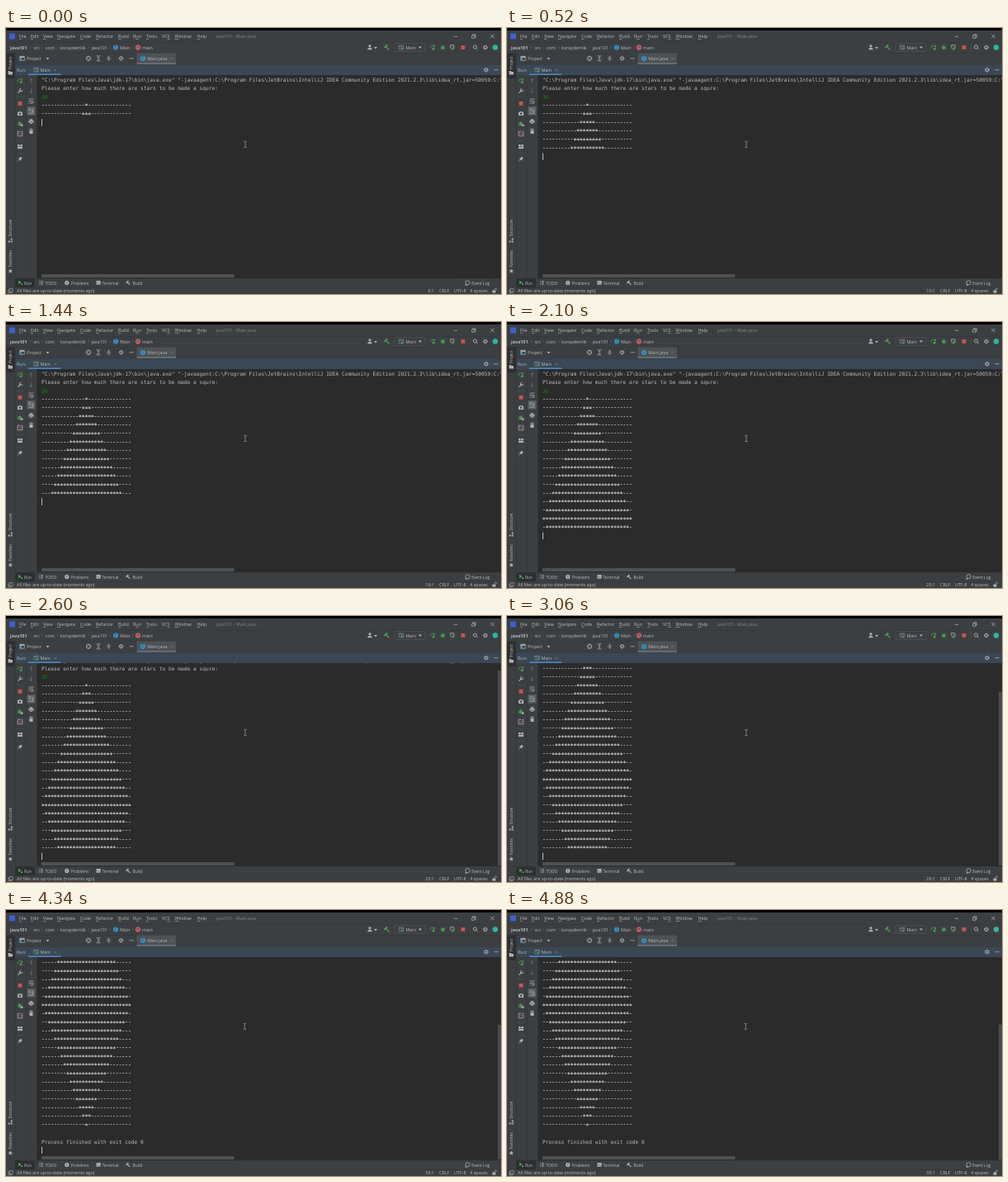
Write an HTML page that moves like this. It is 600 by 322 pixels and loops after 4920 ms.

```html
<!DOCTYPE html>
<html lang="en">
<head>
<meta charset="utf-8">
<title>Star diamond in the console</title>
<style>
html, body { margin: 0; width: 100%; height: 100%; overflow: hidden; background: #3c3f41; }
svg { display: block; width: 100vw; height: 100vh; }
text { font-family: "Open Sans", "Noto Sans", sans-serif; fill: #bbbbbb; white-space: pre; }
#console text { font-family: "DejaVu Sans Mono", monospace; font-size: 6.24px; }
#console .stars { stroke: #bbbbbb; stroke-width: .28px; }
.u { text-decoration: underline; text-decoration-thickness: .4px; }
</style>
</head>
<body>
<svg viewBox="0 0 600 322" preserveAspectRatio="none">
  <defs><clipPath id="view"><rect x="38" y="57" width="562" height="245"/></clipPath></defs>
  <g id="chrome"></g>
  <g clip-path="url(#view)"><g id="console"></g></g>
  <g id="over"></g>
</svg>
<script>
const NS = "http://www.w3.org/2000/svg";
const $ = id => document.getElementById(id);
const chrome = $("chrome"), con = $("console"), over = $("over");

function add(parent, tag, attrs, str) {
  const el = document.createElementNS(NS, tag);
  for (const k in attrs) el.setAttribute(k, attrs[k]);
  if (str !== undefined) el.textContent = str;
  return parent.appendChild(el);
}
const box = (x, y, width, height, fill, g = chrome) => add(g, "rect", { x, y, width, height, fill });
const label = (x, y, str, opt = {}) => add(chrome, "text", { x, y, "font-size": 5.4, ...opt }, str);
const GREY = "#afb1b3", GREEN = "#499c54", RED = "#c75450", BLUE = "#3592c4", DIM = "#6b6e70";

// line icon centred on x, y
const icon = (x, y, d, stroke = GREY, fill = "none", w = .8) =>
  add(chrome, "path", { d, stroke, fill, "stroke-width": w, transform: `translate(${x} ${y})` });
const solid = (x, y, d, fill = GREY) => icon(x, y, d, "none", fill);
const dot = (x, y, r, fill) => add(chrome, "circle", { cx: x, cy: y, r, fill });

const cross = (x, y, s = 1.3, c = "#7d8082") => icon(x, y, `M${-s} ${-s}L${s} ${s}M${s} ${-s}L${-s} ${s}`, c, "none", .6);
const drop = (x, y) => solid(x, y, "M-2 -1H2L0 1.4Z");
const minus = (x, y) => icon(x, y, "M-2.6 0H2.6");
const stop = (x, y) => box(x - 2.4, y - 2.4, 4.8, 4.8, RED);
const play = (x, y, s = 1) => solid(x, y, `M${-2 * s} ${-2.6 * s}L${2.4 * s} 0L${-2 * s} ${2.6 * s}Z`, GREEN);
const rule = (x, y, w = 9) => box(x, y, w, .5, "#515151");
function gear(x, y) {
  add(chrome, "circle", { cx: x, cy: y, r: 2.4, fill: "none", stroke: GREY, "stroke-width": 1, "stroke-dasharray": "1.1 .78" });
  add(chrome, "circle", { cx: x, cy: y, r: 1.6, fill: "none", stroke: GREY, "stroke-width": 1 });
}
function rerun(x, y) {
  icon(x, y, "M-2.6 .8A2.6 2.6 0 0 1 1.6 -1.8", GREEN, "none", .9);
  solid(x, y, "M.4 -.6H3V-3.2Z", GREEN);
  box(x - .2, y + .4, 2.8, 2.6, GREEN);
}
function bug(x, y) {
  add(chrome, "ellipse", { cx: x, cy: y + .3, rx: 1.7, ry: 2.4, fill: GREEN });
  icon(x, y, "M-2.8 -1.6L2.8 2M2.8 -1.6L-2.8 2M-2.9 .3H2.9M-1 -3L0 -2L1 -3", GREEN, "none", .6);
}
function classIcon(x, y, c = BLUE, ch = "C") {
  dot(x, y, 3.1, c);
  label(x, y + 1.6, ch, { "font-size": 4.4, "text-anchor": "middle", style: "fill:#2f3437" });
}
function runConfig(x, y) {
  icon(x, y, "M-2.8 -2.4H2.8V2.4H-2.8ZM-2.8 -1.2H2.8", "#87929a", "none", .6);
  solid(x + 1.2, y + 1.2, "M-1.4 -1.7L1.6 0L-1.4 1.7Z", GREEN);
}
const folder = (x, y) => solid(x, y, "M-2.7 -2.2H-.5L.3 -1.3H2.7V2.2H-2.7Z");

function drawTop() {
  box(0, 0, 600, 322, "#3c3f41");
  box(0, 0, 600, 3, "#000");
  box(4, 6.5, 7, 7, "#3b5fd0");

  const menu = [["File", 16], ["Edit", 30], ["View", 45], ["Navigate", 62], ["Code", 90], ["Refactor", 109],
    ["Build", 136], ["Run", 154, 1], ["Tools", 170], ["VCS", 189, 2], ["Window", 204.5], ["Help", 231.5]];
  for (const [name, x, k = 0] of menu) {
    const t = label(x, 12, name.slice(0, k));
    add(t, "tspan", { class: "u" }, name[k]);
    add(t, "tspan", {}, name.slice(k + 1));
  }
  label(255, 12, "java101 - Main.java", { style: "fill:#85888a" });
  icon(545, 10, "M-2.2 .3H2.2", "#ccc", "none", .6);
  icon(567, 10, "M-2.3 -1H1V2.3H-2.3ZM-1.2 -1V-2.2H2.2V1.2H1", "#ccc", "none", .6);
  cross(589.5, 10, 2.2, "#ccc");

  const y = 25.6;
  label(5, y, "java101", { "font-weight": 700 });
  label(33.5, y, "src");
  label(48, y, "com");
  label(66, y, "koraydemlik");
  label(103.5, y, "java101");
  label(138, y, "Main");
  label(165, y, "main");
  for (const x of [30, 44, 63, 100, 126, 154]) icon(x, 23.6, "M-.6 -1.4L.6 0L-.6 1.4", DIM, "none", .5);
  classIcon(133, 23.5);
  classIcon(160, 23.5, "#d3616b", "m");

  dot(441, 21.8, 1.6, GREY);
  solid(441, 23.5, "M-3 2.8Q-2.6 .3 0 .3Q2.6 .3 3 2.8Z");
  drop(448, 24);
  icon(461.5, 23.5, "M-1.2 -1.2L3 3", GREEN, "none", 1.3);
  icon(461.5, 23.5, "M-3 .4L.6 -3", GREEN, "none", 1.9);
  add(chrome, "rect", { x: 471, y: 18.5, width: 37, height: 10, rx: 1, fill: "none", stroke: "#595c5e", "stroke-width": .5 });
  runConfig(479, 23.5);
  label(484.5, y, "Main");
  drop(502, 23.5);
  rerun(517, 23.5);
  bug(529.5, 23.5);
  icon(541, 23.2, "M-2.4 -2.4H2V.6Q1.4 2.4 -.2 3Q-2.4 1.8 -2.4 -2.4Z");
  play(542.6, 24.6, .7);
  stop(554, 23.5);
  box(562, 19, .5, 9, "#515151");
  icon(568.5, 23, "M1.5 1.5L3.2 3.2M2 0A2 2 0 1 1 -2 0A2 2 0 1 1 2 0", GREY, "none", .9);
  gear(581, 23.5);
  dot(593, 23.5, 3.2, "#2fb5a0");

  for (const v of [17, 30, 44]) box(0, v, 600, .5, "#323435");
  icon(19.5, 36.8, "M-2.8 -2.5H2.8V2.5H-2.8Z", GREY, "none", .7);
  box(16.8, 34.3, 5.4, 1.6, GREY);
  box(16.8, 36, 2.2, 3.2, BLUE);
  label(25.2, 38.7, "Project");
  drop(50.5, 37);
  icon(100, 36.8, "M2.7 0A2.7 2.7 0 1 1 -2.7 0A2.7 2.7 0 1 1 2.7 0M0 -2.7V-.9M0 2.7V.9M-2.7 0H-.9M2.7 0H.9");
  icon(112, 36.8, "M-2.6 -3H2.6M-2.6 3H2.6M0 -2V2M-1.2 -.8L0 -2L1.2 -.8M-1.2 .8L0 2L1.2 .8", GREY, "none", .7);
  icon(124.5, 36.8, "M-2.6 0H2.6M0 -3V-1M0 3V1M-1.2 -2.2L0 -1L1.2 -2.2M-1.2 2.2L0 1L1.2 2.2", GREY, "none", .7);
  gear(139.5, 36.8);
  minus(152, 36.8);
  box(158.5, 30.5, 47.5, 13, "#4e5254");
  box(158.5, 42.3, 47.5, 1.4, "#747a80");
  classIcon(166, 36.8);
  label(171.2, 38.7, "Main.java");
  cross(200.5, 37);
}

function drawPanels() {
  box(11, 44.5, 589, 12.5, "#3b4754");
  label(13, 52.7, "Run:");
  runConfig(36.5, 50.7);
  label(41.5, 52.7, "Main");
  cross(60, 51);
  box(27, 55.4, 39.5, 1.6, "#4a88c7");
  gear(582, 50.7);
  minus(594, 50.7);

  // console and its two toolbars
  box(37.5, 57, 562.5, 246, "#2b2b2b");
  box(23.8, 57, .5, 246, "#323435");
  box(37, 57, .5, 246, "#323435");
  rerun(17, 64);
  icon(17, 76, "M-2.4 2.6L.8 -.6", GREY, "none", 1.3);
  icon(17, 76, "M1.2 -2.8A1.7 1.7 0 1 0 2.9 -1", GREY, "none", 1);
  rule(12.5, 83.5);
  stop(17, 91.3);
  solid(17, 103.5, "M-3 -1.7H-1.3L-.8 -2.6H.8L1.3 -1.7H3V2.4H-3Z");
  dot(17, 103.8, 1.2, "#3c3f41");
  bug(16.6, 115.8);
  box(18, 116.5, 2.4, 2.4, GREY);
  icon(17, 128, "M.4 -2.8H-2.8V2.8H2.8V-2.8H1.6");
  icon(17, 128, "M-1.6 0H1.4M.2 -1.2L1.4 0L.2 1.2", RED);
  rule(12.5, 136);
  for (const [dx, dy, w] of [[-3, -2.4, 2.6], [.2, -2.4, 2.8], [-3, .4, 6]]) box(17 + dx, 143.5 + dy, w, 2.2, GREY);
  rule(12.5, 151);
  icon(17, 158.5, "M-2.8 2.8L-.6 .6M-2 -.8L.8 2", GREY);
  solid(17, 158.5, "M-1.4 -.4L.8 -2.8L2.8 -.8L.4 1.4Z");

  icon(30.5, 64, "M0 2.6V-2.4M-1.8 -.6L0 -2.4L1.8 -.6", DIM);
  icon(30.5, 76, "M0 -2.6V2.4M-1.8 .6L0 2.4L1.8 .6", DIM);
  icon(30.5, 88.5, "M-3 -2.4H3M-3 0H1.6A1.2 1.2 0 0 1 1.6 2.4H0M1 1.4L0 2.4L1 3.4M-3 2.4H-1.4");
  box(25.5, 95.2, 10, 10.4, "#5c6164");
  icon(30.5, 100.4, "M-3 -2.6H0M-3 -.6H0M-3 2.8H3M1.8 -2.8V1.4M.6 .2L1.8 1.4L3 .2");
  solid(30.5, 113, "M-1.8 -2.8H1.8V-1.3H-1.8ZM-3 -.9H3V1.8H1.8V.6H-1.8V1.8H-3ZM-1.4 1.2H1.4V2.8H-1.4Z");
  solid(30.5, 125, "M-2.5 -2.6H-1V-3.2H1V-2.6H2.5V-1.7H-2.5ZM-2 -1.1H2V3H-2Z");

  // left stripe
  box(0, 30.5, 10.8, 30.5, "#2d2f30");
  box(10.8, 30.5, .5, 272, "#323435");
  const side = (y, s) => label(0, 0, s, { "font-size": 4.8, transform: `translate(7.4 ${y}) rotate(-90)` });
  side(50, "Project");
  side(252.5, "Structure");
  side(289.5, "Favorites");
  folder(5.3, 54.3);
  solid(5.3, 257, "M-2.6 .4H-.6V2.4H-2.6ZM.4 .4H2.4V2.4H.4ZM.4 -2.6H2.4V-.6H.4Z");
  solid(5.3, 294, "M0 -2.8L.8 -.8L2.8 -.8L1.2 .5L1.8 2.6L0 1.4L-1.8 2.6L-1.2 .5L-2.8 -.8L-.8 -.8Z");
}

function drawBottom() {
  box(0, 302.8, 600, .5, "#323435");
  box(11, 303.2, 24, 10.8, "#2d2f30");
  box(0, 314, 600, .5, "#323435");
  const tab = (x, s) => label(x, 310.5, s, { "font-size": 4.9 });
  play(16.8, 308, .9);
  dot(19.2, 310.2, .9, "#5fd06c");
  tab(22, "Run");
  icon(42.5, 308.4, "M-2.4 -1.8H-1.4M-.6 -1.8H2.4M-2.4 0H-1.4M-.6 0H2.4M-2.4 1.8H-1.4M-.6 1.8H2.4");
  tab(47.5, "TODO");
  dot(73.8, 308.4, 2.6, GREY);
  icon(73.8, 308.4, "M0 -1.6V.4M0 1V1.7", "#3c3f41");
  tab(78.8, "Problems");
  box(109.4, 306, 5.2, 4.8, GREY);
  icon(112, 308.4, "M-1.7 -1.2L-.5 0L-1.7 1.2M0 1.4H1.7", "#3c3f41", "none", .6);
  tab(116.5, "Terminal");
  icon(148, 308.4, "M-.8 -.8L2.4 2.4", GREY, "none", 1.1);
  icon(148, 308.4, "M-2.4 .4L.4 -2.2", GREY, "none", 1.6);
  tab(153.5, "Build");
  icon(559.5, 308.2, "M2.6 0A2.6 2.6 0 1 1 -2.6 0A2.6 2.6 0 1 1 2.6 0M-1.8 1.8L-2.6 3.2L-.4 2.6");
  tab(564.2, "Event Log");

  icon(5.5, 318, "M-1.4 -2.4H2.6V1.4H-1.4ZM-1.4 -1H-2.6V2.6H1.4V1.4", GREY, "none", .6);
  label(13, 320, "All files are up-to-date (moments ago)");
  label(525, 320, "CRLF");
  label(543, 320, "UTF-8");
  label(562.3, 320, "4 spaces");
  box(589.5, 317.6, 4, 3, GREY);
  icon(591.5, 317.6, "M.8 0V-1.4A1.2 1.2 0 0 1 3.2 -1.4V-.8", GREY, "none", .7);
}

drawTop();
drawPanels();
drawBottom();
const place = label(519, 320, "", { "text-anchor": "end" });

// console content
const PITCH = 10.32, HALF = 15, LINES = 2 * HALF - 1;
const base = row => 65 + (row - 1) * PITCH;
const line = (row, str, attrs) => add(con, "text", { x: 43, y: base(row), ...attrs }, str);

line(1, String.raw`"C:\Program Files\Java\jdk-17\bin\java.exe" "-javaagent:C:\Program Files\JetBrains\IntelliJ IDEA Community Edition 2021.2.3\lib\idea_rt.jar=50059:C:\Program Files`);
line(2, "Please enter how much there are stars to be made a squre:");
line(3, "30", { style: "fill:#0a8a14;font-style:italic" });

// dashes sit high and asterisks low, so both share one axis
const RAISE = -.9, LOWER = 1.35;
const stars = Array.from({ length: LINES }, (_, i) => {
  const dashes = Math.abs(HALF - 1 - i);
  const t = line(i + 4, "-".repeat(dashes), { class: "stars", dy: RAISE });
  add(t, "tspan", { dy: dashes ? LOWER : RAISE + LOWER }, "*".repeat(LINES - 2 * dashes));
  add(t, "tspan", { dy: -LOWER }, "-".repeat(dashes));
  return t;
});
const exit = line(34, "Process finished with exit code 0");
const caret = box(43.1, 0, .9, 8.4, "#d0d0d0", con);

box(43, 298, 233.5, 4, "#4f5051", over);
const thumb = box(596, 57, 4, 245, "#4a4b4c", over);
const beam = add(over, "path", { d: "M-1.8 -3.7Q-.4 -3.7 0 -3Q.4 -3.7 1.8 -3.7M0 -3V3M-1.8 3.7Q-.4 3.7 0 3Q.4 3.7 1.8 3.7", fill: "none", stroke: "#a0a0a0", "stroke-width": .75 });

const LOOP = 4920, STEP = 152.7, LEAD = 149.5, END = 4140, LAG = 30;
const count = t => Math.min(LINES, 2 + Math.floor((t + LEAD) / STEP));
const caretRow = t => t >= END ? 35 : count(t) + 4;
const show = (el, on) => el.setAttribute("visibility", on ? "visible" : "hidden");

function draw(ms) {
  const t = ms < 40 ? 0 : Math.floor(ms / 20) * 20;
  const n = count(t), row = caretRow(t);
  const scroll = row > 23 ? 9.3 + (row - 24) * PITCH : 0;
  stars.forEach((s, i) => show(s, i < n));
  show(exit, t >= END);
  con.setAttribute("transform", `translate(0 ${-scroll})`);
  caret.setAttribute("y", base(row) - 6.4);
  show(caret, t < END + 500);
  const top = 245 * scroll / (245 + scroll);
  thumb.setAttribute("y", 57 + top);
  thumb.setAttribute("height", 245 - top);
  show(thumb, scroll > 0);
  place.textContent = caretRow(t - LAG) + ":1";
  beam.setAttribute("transform", `translate(${t < 3340 ? 290 : 289.3} 141)`);
}
function tick() {
  draw(performance.now() % LOOP);
  requestAnimationFrame(tick);
}
tick();
</script>
</body>
</html>
```
